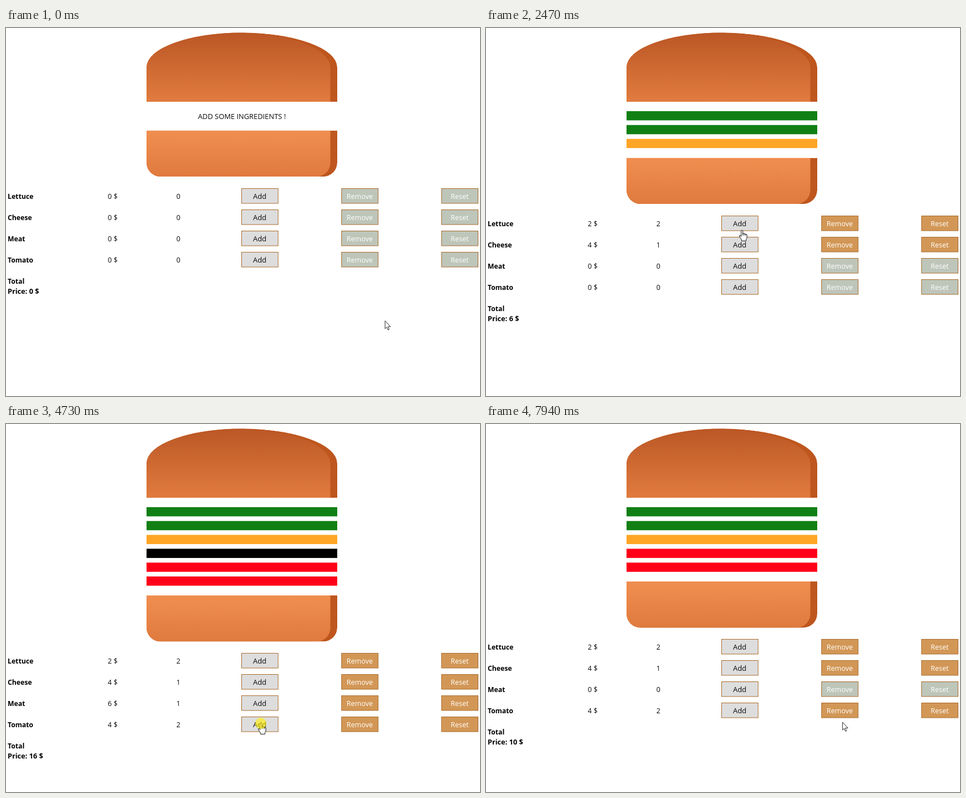
An HTML page for the animation above (8 s loop, 850 by 659 pixels).

```html
<!DOCTYPE html>
<html lang="en">
<head>
<meta charset="utf-8">
<title>Burger builder</title>
<style>
  html, body { margin: 0; width: 100%; height: 100%; overflow: hidden; background: #fff; }
  svg { display: block; width: 850px; height: 659px; }
  text { font: 12.5px "Open Sans", "Noto Sans", sans-serif; fill: #0a0a0a; white-space: pre; }
  .bold { font-weight: 700; font-size: 12.2px; fill: #000; }
  .mid { text-anchor: middle; }
</style>
</head>
<body>
<svg viewBox="0 0 850 659">
  <defs>
    <linearGradient id="crust" x2="0" y2="1">
      <stop stop-color="#bb5725"/><stop offset="1" stop-color="#e17b3f"/>
    </linearGradient>
    <linearGradient id="crumb" x2="0" y2="1">
      <stop stop-color="#f08e50"/><stop offset="1" stop-color="#e07a3e"/>
    </linearGradient>
    <path id="lid" d="M252 132.2V70.3A171 62 0 0 1 594 70.3V132.2Z"/>
    <path id="base" d="M252 0H594V57.8A24.8 24.8 0 0 1 569.2 82.6H276.8A24.8 24.8 0 0 1 252 57.8Z"/>
    <clipPath id="lidClip"><use href="#lid"/></clipPath>
    <clipPath id="baseClip"><use href="#base"/></clipPath>
  </defs>
  <g clip-path="url(#lidClip)">
    <use href="#lid" fill="#be561e"/><use href="#lid" x="-12.4" fill="url(#crust)"/>
  </g>
  <g id="layers"></g>
  <g id="bottom"><g clip-path="url(#baseClip)">
    <use href="#base" fill="#be561e"/><use href="#base" x="-12.4" fill="url(#crumb)"/>
  </g></g>
  <g id="panel"></g>
  <g id="cursor" fill="#fff" stroke="#111" stroke-linejoin="round" stroke-linecap="round">
    <path id="arrow" d="M.3 .3V14L3.3 11.2 5.5 16.2 7.6 15.3 5.4 10.4H9.6Z" stroke-width=".9"/>
    <path id="hand" d="M-1.5 1.4Q-1.5 .3 0 .3T1.5 1.4V6Q3.2 5.2 4 6.5 5.7 5.8 6.5 7.2 8.8 6.8 9 9V12.5Q9 14.6 7.4 16.6V19.3H-.6V17.2Q-2.2 15.2-4.4 11 -4.9 8.9-3 9.3L-1.5 11ZM1.5 6V9M4 6.5V9.2M6.5 7.2V9.4"/>
    <circle id="press" r="10" fill="#fff000" fill-opacity=".62" stroke="none"/>
  </g>
</svg>
<script>
const NS = "http://www.w3.org/2000/svg";
const LOOP = 8000, STEP = 24.83, ROW = 38, HOLD = 70;
const foods = [
  { name: "Lettuce", price: 1, color: "#108014" },
  { name: "Cheese", price: 4, color: "#ffa526" },
  { name: "Meat", price: 6, color: "#000" },
  { name: "Tomato", price: 2, color: "#ff0019" }
];
const [LETTUCE, CHEESE, MEAT, TOMATO] = foods.keys();
const columns = ["Add", "Remove", "Reset"].map((label, i) => ({ label, x: 422 + 179.25 * i }));

const byId = id => document.getElementById(id);
const sum = list => list.reduce((a, b) => a + b, 0);
const panelTop = n => n ? Math.round(286.1 + STEP * (n - 1)) : 287;

// The script: the pointer glides between buttons, and each click changes the stack.
const glides = [], clicks = [];
let size = 0, tip = [679.5, 524.5];

function glide(go, arrive, x, y) {
  glides.push({ go, arrive, from: tip, to: [x, y], size });
  tip = [x, y];
}
function click(food, change, go, arrive, release, dx = 0, dy = 0) {
  const col = change > 0 ? 0 : 1;
  glide(go, arrive, columns[col].x + 37 + dx, panelTop(size) + food * ROW + 13 + dy);
  clicks.push({ food, change, release });
  size += change;
}
click(LETTUCE, 1, 70, 600, 680, 16);
click(LETTUCE, 1, 890, 1270, 1500, 4, -12);
click(CHEESE, 1, 1890, 2280, 2390);
click(MEAT, 1, 2720, 3000, 3130);
click(TOMATO, 1, 3190, 3520, 3790);
click(TOMATO, 1, 4060, 4250, 4380);
click(TOMATO, 1, 4440, 4650, 4800, -2, -1);
glide(4930, 5310, 575, 555);
glide(5790, 5920, 622, 556);
click(MEAT, -1, 5920, 6050, 6690, 17, 10);
click(TOMATO, -1, 7120, 7300, 7440, 8, -1);
glide(7939, 7940, 639, 534);

function set(node, attrs) {
  for (const key in attrs) node.setAttribute(key, attrs[key]);
}
function add(parent, tag, attrs, text = "") {
  const node = document.createElementNS(NS, tag);
  set(node, attrs);
  node.textContent = text;
  return parent.appendChild(node);
}
function show(node, on) {
  set(node, { visibility: on ? "visible" : "hidden" });
}

const layers = byId("layers"), panel = byId("panel");
const hint = add(layers, "text", { x: 423, y: 163, class: "mid", style: "font-size:12.85px" }, "ADD SOME INGREDIENTS !");
const strips = Array.from({ length: 7 }, (_, i) =>
  add(layers, "rect", { x: 252, y: 148.9 + STEP * i, width: 342, height: 16.5 }));

const rows = foods.map((food, i) => {
  const g = add(panel, "g", { transform: `translate(0 ${i * ROW})` });
  add(g, "text", { x: 3, y: 19, class: "bold" }, food.name);
  const cost = add(g, "text", { x: 182.5, y: 19 });
  const count = add(g, "text", { x: 309, y: 19, class: "mid" });
  const buttons = columns.map(({ label, x }, c) => {
    const box = add(g, "rect", { x: x + .5, y: .5, width: 65.5, height: 26.5, fill: "#ddd", stroke: "#aa6c2c" });
    add(g, "text", { x: x + 33, y: 19, class: "mid", style: c ? "fill:#fff" : "font-size:12.9px" }, label);
    return box;
  });
  return { cost, count, buttons };
});
add(panel, "text", { x: 3, y: 171, class: "bold" }, "Total");
const total = add(panel, "text", { x: 3, y: 188.5, class: "bold", style: "font-size:12.7px" });

function pointerAt({ go, arrive, from, to }, t) {
  const u = Math.max(0, Math.min(1, (t - go) / (arrive - go)));
  const k = u * u * (3 - 2 * u);
  return from.map((v, i) => v + (to[i] - v) * k);
}

function buttonAt(x, y, top) {
  const col = columns.findIndex(c => x >= c.x && x <= c.x + 66.5);
  const row = Math.floor((y - top) / ROW);
  const inside = col >= 0 && row >= 0 && row < foods.length && y - top - row * ROW <= 27.5;
  return inside ? { row, col } : null;
}

function draw(t) {
  const counts = foods.map((_, i) =>
    sum(clicks.filter(c => c.food === i && t >= c.release).map(c => c.change)));
  const n = sum(counts);
  const move = glides.filter(g => t >= g.go).pop() || glides[0];
  const [x, y] = pointerAt(move, t);
  // hover is only refreshed when the pointer moves
  const over = buttonAt(x, y, panelTop(t < move.arrive || n === move.size ? n : move.size));

  const stack = foods.flatMap((food, i) => Array(counts[i]).fill(food.color));
  strips.forEach((strip, i) => {
    show(strip, i < n);
    set(strip, { fill: stack[i] || "none" });
  });
  show(hint, n === 0);
  set(byId("bottom"), { transform: `translate(0 ${n ? 182.8 + STEP * (n - 1) : 183.5})` });
  set(panel, { transform: `translate(0 ${panelTop(n)})` });

  rows.forEach(({ cost, count, buttons }, i) => {
    cost.textContent = `${counts[i] * foods[i].price} $`;
    count.textContent = counts[i];
    for (const c of [1, 2]) {
      const lit = over && over.row === i && over.col === c;
      set(buttons[c], { fill: !counts[i] ? "#bec5b9" : lit ? "#daa874" : "#d29756" });
    }
  });
  total.textContent = `Price: ${sum(counts.map((c, i) => c * foods[i].price))} $`;

  set(byId("cursor"), { transform: `translate(${x} ${y})` });
  show(byId("hand"), over);
  show(byId("arrow"), !over);
  show(byId("press"), clicks.some(c => t >= c.release - HOLD && t < c.release));
}

const start = performance.now();
function tick() {
  draw((performance.now() - start) % LOOP);
  requestAnimationFrame(tick);
}
draw(0);
requestAnimationFrame(tick);
</script>
</body>
</html>
```
